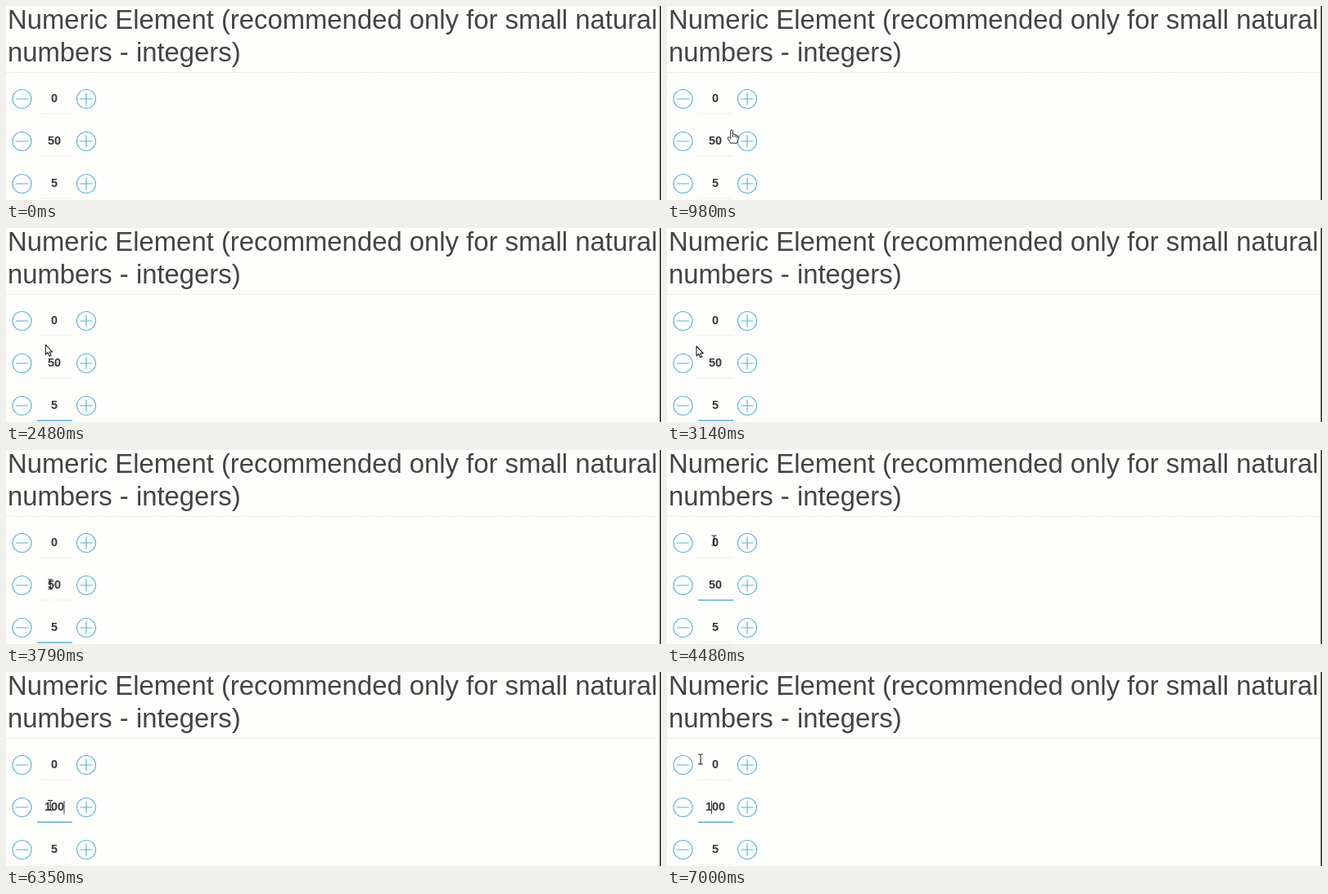
Write an HTML page that moves like this. It is 800 px wide and 238 px high and loops after 7040 ms.

```html
<!DOCTYPE html>
<html lang="en">
<head>
<meta charset="utf-8">
<title>Numeric element</title>
<style>
  html, body { margin: 0; width: 100%; height: 100%; overflow: hidden; background: #fdfdfc; }
  svg { display: block; }
  text { font-family: "Liberation Sans", Arial, sans-serif; fill: #444; }
  .title { font-size: 32.84px; }
  .value { font-size: 14.4px; font-weight: bold; text-anchor: middle; fill: #383838; }
  .button { fill: #fdfefe; stroke: #5ab3c8; stroke-width: 1.15; }
  .rule { fill: none; stroke: #e6e6de; stroke-dasharray: 2 2; }
  .focus { stroke: #62b3cc; stroke-width: 1.6; }
  .cursor { fill: #fff; stroke: #222; stroke-width: 1.1; stroke-linejoin: round; }
</style>
</head>
<body>
<svg width="800" height="238" viewBox="0 0 800 238">
  <rect width="800" height="238" fill="#fdfdfc"/>
  <text class="title" x="2" y="28">Numeric Element (recommended only for small natural</text>
  <text class="title" x="2" y="68">numbers - integers)</text>
  <path class="rule" d="M0 81.5H798"/>
  <rect x="798.5" width="1.5" height="238" fill="#222"/>
  <g id="rows"></g>
  <path id="caret" stroke="#383838" d="M0 158V174"/>
  <g id="hand"><path class="cursor" transform="scale(.9)" d="M-1.5 10V1.3Q-1.5 0 0 0T1.5 1.3V6L3 5.5Q4.3 5.5 4.5 6.7Q6.2 6 7 7.7Q8.8 7.3 9 9V13L7 18H-1.5L-5.5 11.5Q-5.6 9.3-3.8 9.8L-1.5 12ZM1.5 6V10M4.5 7V10M7 8V11"/></g>
  <path id="arrow" class="cursor" d="M0 0V12L2.7 9.5L4.8 14L6.8 13L4.7 8.8H8.5Z"/>
  <path id="beam" class="cursor" d="M-3-6H-1Q0-6 0-5Q0-6 1-6H3M0-5V5M-3 6H-1Q0 6 0 5Q0 6 1 6H3"/>
</svg>
<script>
const LOOP = 7040;
const byId = id => document.getElementById(id);
const show = (node, on) => node.setAttribute("visibility", on ? "visible" : "hidden");

byId("rows").innerHTML = [0, 50, 5].map((value, i) => `
  <g transform="translate(0 ${i * 52})">
    <circle class="button" cx="19.5" cy="114" r="11.5"/>
    <circle class="button" cx="98" cy="114" r="11.5"/>
    <path class="button" d="M12 114H27M90.5 114H105.5M98 106.5V121.5"/>
    <path class="rule" d="M38 132H81"/>
    <path class="focus" d="M38 132.2H81"/>
    <text class="value" x="59" y="118">${value}</text>
  </g>`).join("");

const values = document.querySelectorAll(".value");
const underlines = document.querySelectorAll(".focus");
const pointers = ["hand", "arrow", "beam"];

// time, x, y, pointer shape until the next stop
const stops = [
  [600, 98, 190, "hand"],
  [980, 79, 152, "hand"],
  [1200, 70, 195, "beam"],
  [1350, 60, 214, "beam"],
  [1500, 60, 214, "hand"],
  [1790, 65, 142, "hand"],
  [2300, 50, 143, "arrow"],
  [3140, 36, 145, "arrow"],
  [3600, 52, 164, "beam"],
  [4050, 58, 166, "beam"],
  [4480, 57.5, 111, "beam"],
  [5000, 65, 85, "hand"],
  [5740, 67, 61, "hand"],
  [6100, 56, 130, "beam"],
  [6400, 54, 166, "beam"],
  [6600, 54, 166, "beam"],
  [7000, 41, 107, "beam"],
  [7040, 41, 107, "beam"]
];

function movePointer(t) {
  const next = stops.findIndex(stop => stop[0] > t);
  let active = "";
  if (next > 0) {
    const [t0, x0, y0, shape] = stops[next - 1];
    const [t1, x1, y1] = stops[next];
    const p = (t - t0) / (t1 - t0), k = p * p * (3 - 2 * p);
    active = shape;
    byId(shape).setAttribute("transform", `translate(${x0 + (x1 - x0) * k} ${y0 + (y1 - y0) * k})`);
  }
  pointers.forEach(id => show(byId(id), id === active));
}

function render(t) {
  const focused = t < 1400 ? -1 : t < 3850 ? 2 : 1;
  underlines.forEach((line, i) => show(line, i === focused));
  values[1].textContent = t < 5150 ? "50" : "100";
  byId("caret").setAttribute("transform", `translate(${t < 6450 ? 71 : 54.5} 0)`);
  show(byId("caret"), t >= 5150);
  movePointer(t);
}

function frame() {
  render(performance.now() % LOOP);
  requestAnimationFrame(frame);
}
frame();
</script>
</body>
</html>
```
